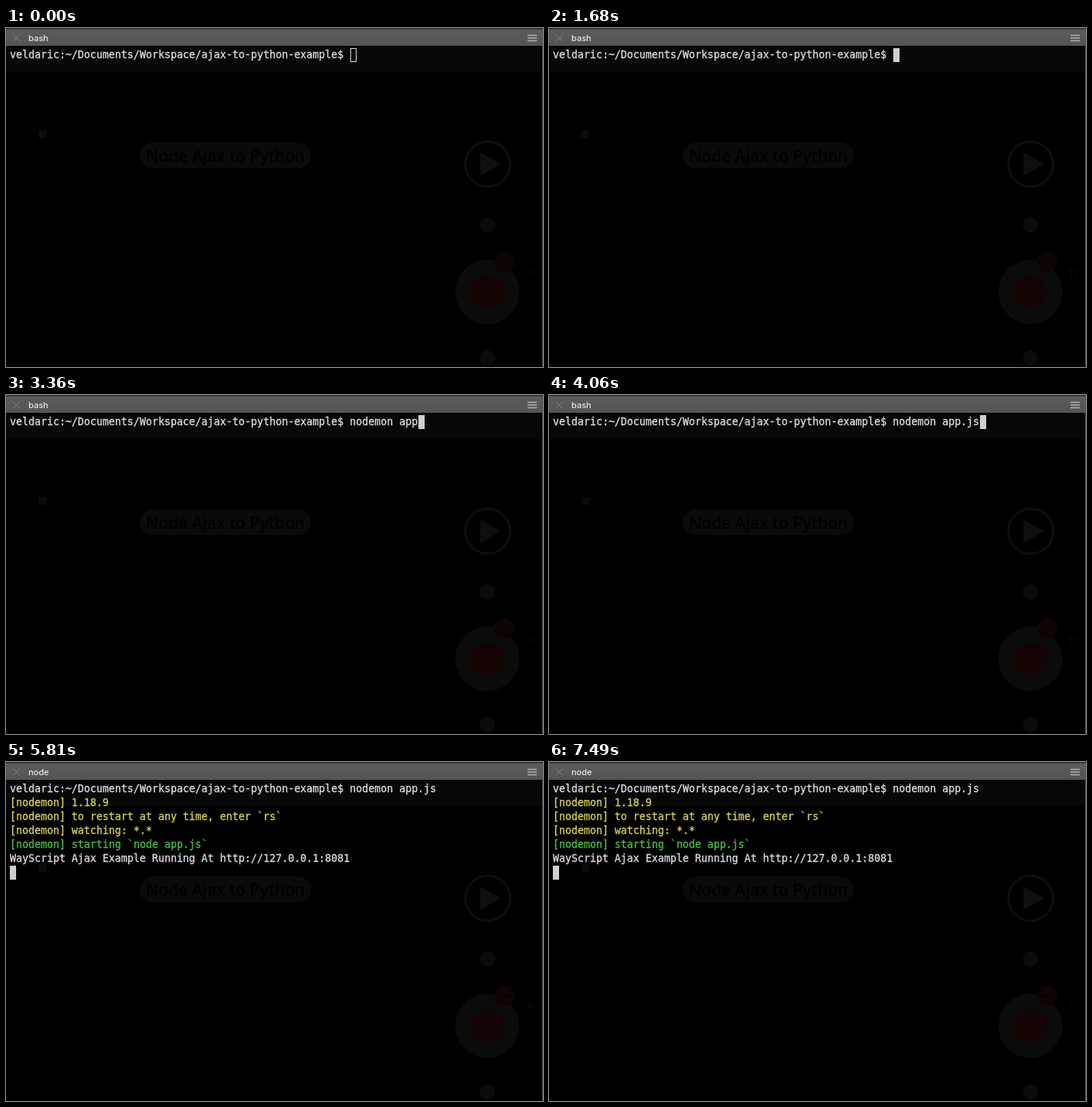
An HTML page that plays this animation: 694 px wide and 438 px high, repeating every 7630 ms.

```html
<!DOCTYPE html>
<html lang="en">
<head>
<meta charset="utf-8">
<title>Terminal session</title>
<style>
  html, body { margin: 0; width: 100%; height: 100%; overflow: hidden; background: #000; }
  svg { display: block; width: 694px; height: 438px; }
  .term { font: 13.288px "DejaVu Sans Mono", "Noto Sans Mono", monospace; white-space: pre;
          fill: #dedede; stroke: #dedede; stroke-width: .3px; }
  .yellow { fill: #d6d15c; stroke: #d6d15c; }
  .green { fill: #47bf47; stroke: #47bf47; }
  .ui { font: 500 11px Inter, sans-serif; fill: #e6e6e6; }
  .label { font: 600 20.8px "Open Sans", "Noto Sans", sans-serif; }
</style>
</head>
<body>
<svg viewBox="0 0 694 438">
  <defs>
    <linearGradient id="bar" x2="0" y2="1">
      <stop stop-color="#5c5c5c"/><stop offset="1" stop-color="#545454"/>
    </linearGradient>
  </defs>
  <rect width="694" height="438"/>

  <!-- page showing faintly through the window -->
  <rect y="23" width="694" height="34" fill="#070707"/>
  <rect x="42" y="132" width="10" height="10" fill="#0b0b0b"/>
  <rect x="173" y="148" width="221" height="33" rx="16" fill="#0a0a0a"/>
  <text class="label" x="181" y="173">Node Ajax to Python</text>
  <circle cx="622.5" cy="176" r="29" fill="none" stroke="#0e0e0e" stroke-width="3"/>
  <path d="M613 161v30l27-15z" fill="#0f0f0f"/>
  <g fill="#0b0b0b">
    <circle cx="622" cy="254.5" r="10"/>
    <circle cx="622" cy="426.5" r="10"/>
    <circle cx="622" cy="341" r="41.5"/>
  </g>
  <circle cx="622" cy="341" r="21" fill="#140504"/>
  <circle cx="644" cy="302" r="13" fill="#0f0404"/>
  <path d="M638 302h12" stroke="#050101" stroke-width="3"/>
  <text x="671" y="322" font-family="Open Sans, sans-serif" font-size="14" fill="#0b0b0b">Tr</text>

  <!-- window frame -->
  <rect width="694" height="1.5" fill="#343434"/>
  <rect y="1.5" width="694" height="21.5" fill="url(#bar)"/>
  <path d="M9 8.5l9 9m0-9l-9 9" stroke="#858585"/>
  <path d="M674 9.5h12m-12 3.5h12m-12 3.5h12" stroke="#b0b0b0" stroke-width="1.3"/>
  <path d="M693.5 23V437" stroke="#5a5a5a"/>
  <text id="title" class="ui" x="29" y="17"></text>

  <g id="lines" class="term"></g>
  <rect id="caret"/>
  <g id="pointer" fill="none" stroke="#fff">
    <g id="ring" stroke-width="1.4">
      <circle cx="377" cy="308" r="21.7"/><circle cx="377" cy="308" r="18"/>
    </g>
    <path d="M377 307v14.5l3.4-3.2 2.5 5.4 2.4-1.1-2.5-5.2h4.7z" fill="#000" stroke-width="1.1"/>
  </g>
</svg>
<script>
const LOOP = 7630, COL = 8, ROW = 18, LEFT = 5, TOP = 26;
const prompt = 'veldaric:~/Documents/Workspace/ajax-to-python-example$ ';
const command = 'nodemon app.js';
const keyTimes = [1820, 1960, 2100, 2240, 2380, 2590, 2730, 2870, 3010, 3150, 3360, 3570, 3850, 3990];
const ENTER = 4410, START = 4830, RENAME = 4900, READY = 5180;
const output = [
  [START, 'yellow', '[nodemon] 1.18.9'],
  [START, 'yellow', '[nodemon] to restart at any time, enter `rs`'],
  [START, 'yellow', '[nodemon] watching: *.*'],
  [START, 'green', '[nodemon] starting `node app.js`'],
  [READY, '', 'WayScript Ajax Example Running At http://127.0.0.1:8081']
];
const $ = id => document.getElementById(id);
const show = (el, on) => { el.style.display = on ? '' : 'none'; };

function addLine(row, cls, text) {
  const el = document.createElementNS('http://www.w3.org/2000/svg', 'text');
  el.setAttribute('x', LEFT);
  el.setAttribute('y', TOP + 13 + row * ROW);
  if (cls) el.setAttribute('class', cls);
  el.textContent = text;
  return $('lines').appendChild(el);
}
const promptLine = addLine(0, '', prompt);
const outputLines = output.map(([, cls, text], i) => addLine(i + 1, cls, text));

function placeCaret(col, row, focused) {
  const inset = focused ? 0 : .5;
  const attrs = {
    x: LEFT + col * COL + inset, y: TOP + row * ROW + inset,
    width: COL - 2 * inset, height: ROW - 2 * inset,
    fill: focused ? '#cfcfcf' : 'none', stroke: focused ? 'none' : '#d8d8d8'
  };
  for (const key in attrs) $('caret').setAttribute(key, attrs[key]);
}

function draw(t) {
  const typed = keyTimes.filter(k => k <= t).length;
  const printed = output.filter(([at]) => at <= t).length;
  promptLine.textContent = prompt + command.slice(0, typed);
  outputLines.forEach((el, i) => show(el, i < printed));
  $('title').textContent = t < RENAME ? 'bash' : 'node';
  if (t < ENTER) placeCaret(prompt.length + typed, 0, t >= 700);
  else placeCaret(0, printed + 1, true);
  show($('pointer'), t >= 70 && t < 1680);
  show($('ring'), t >= 560 && t < 770);
}

const begin = performance.now();
function frame() {
  draw((performance.now() - begin) % LOOP);
  requestAnimationFrame(frame);
}
frame();
</script>
</body>
</html>
```
